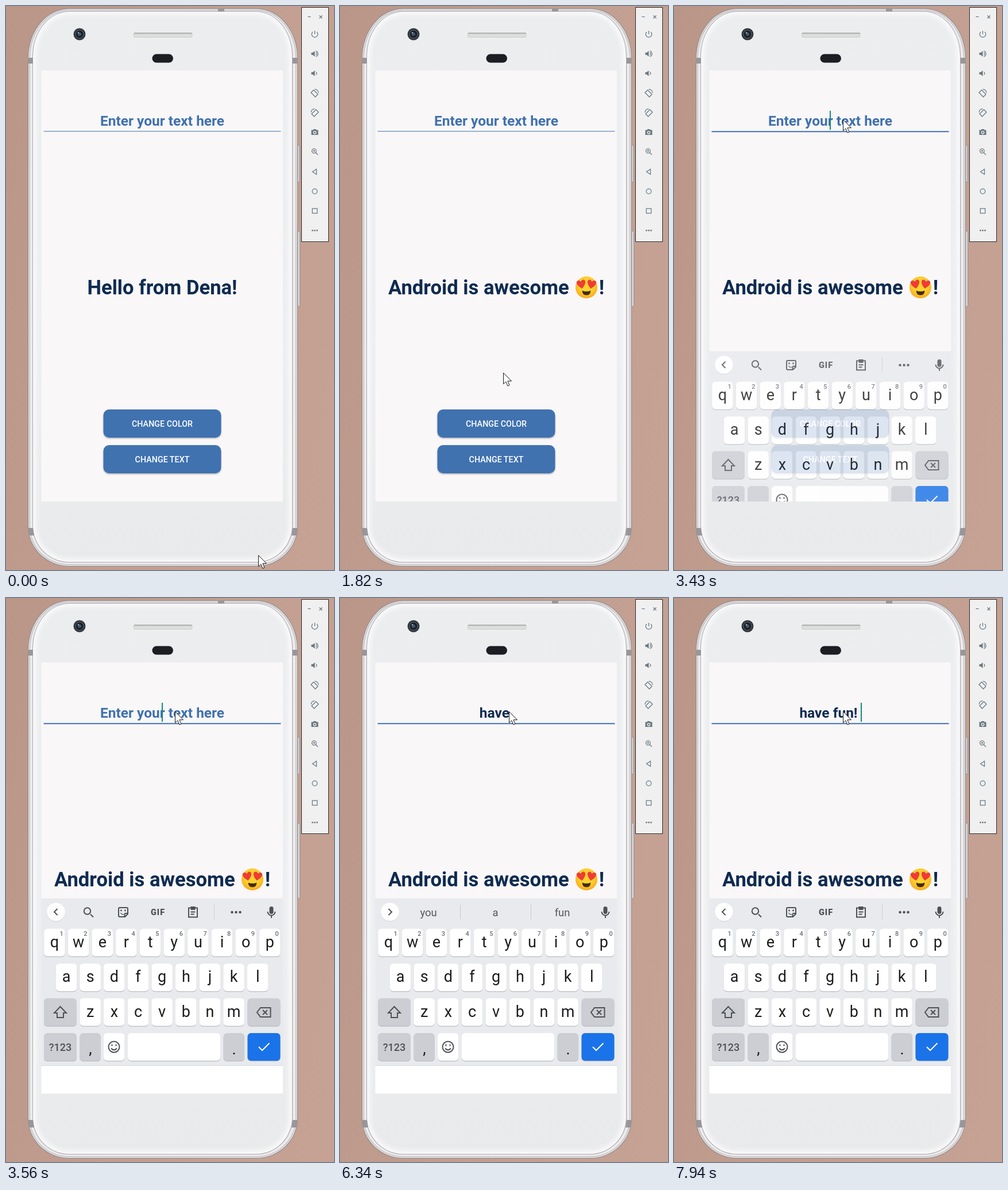
Write an HTML page that moves like this. It is 571x980 px and loops after 8000 ms.

```html
<!DOCTYPE html>
<html lang="en">
<head>
<meta charset="utf-8">
<title>Phone emulator demo</title>
<style>
html, body { margin: 0; width: 100%; height: 100%; overflow: hidden; }
#stage {
  position: relative; width: 571px; height: 980px; overflow: hidden;
  font-family: Roboto, sans-serif;
  background: linear-gradient(100deg, #b99687, #c19e8f 45%, #c6a294);
}
#stage > * { position: absolute; }
svg { left: 0; top: 0; }
text { text-anchor: middle; font-family: Roboto, sans-serif; }
.body {
  left: 38px; top: 4px; width: 470px; height: 970px; box-sizing: border-box;
  border: 1.5px solid #8b878a; background: #dedcde;
  border-radius: 72px 72px 72px 72px / 86px 86px 70px 70px;
  box-shadow: inset 0 0 0 1.5px #e6e4e6, inset 0 0 0 3px #c4c1c3, inset 0 0 0 7px #edebec;
}
.face {
  left: 46px; top: 9px; width: 453px; height: 958px; box-sizing: border-box;
  border: 1px solid #aaa8ad; background: linear-gradient(#ebedee, #edeef0 60%, #e9eaeb);
  border-radius: 64px 64px 64px 64px / 78px 78px 64px 64px;
  box-shadow: inset 0 0 9px 5px #fbfbfc;
}
.tools {
  left: 514px; top: 2px; width: 48px; height: 408px; box-sizing: border-box;
  border: 1px solid #2b2b2b; background: #f0f0f0;
}
.big { font-size: 34.65px; font-weight: 700; fill: #0f2b50; }
.hint { font-size: 24.5px; font-weight: 700; fill: #4071af; }
.btn { font-size: 14.3px; font-weight: 500; fill: #fff; }
.letter { font-size: 27px; fill: #1b1c1e; }
.digit { font-size: 11px; font-weight: 500; fill: #6c6e72; }
.word { font-size: 18.4px; fill: #54575b; }
.line { fill: none; stroke: currentColor; stroke-width: 2; }
.thin { fill: none; stroke: currentColor; stroke-width: 1.25; }
.solid { fill: currentColor; }
#field {
  left: 61px; top: 183.3px; width: 422px; height: 33px; line-height: 33px;
  font-size: 24.5px; font-weight: 700; color: #0f2b50;
  text-align: center; white-space: pre;
}
#field u { text-decoration-thickness: 1.5px; text-underline-offset: 2px; text-decoration-skip-ink: none; }
#caret { display: inline-block; position: relative; width: 0; height: 0; }
#caret::after {
  content: ""; position: absolute; left: -1px; top: -26px;
  width: 2px; height: 33px; background: #12897f;
}
</style>
</head>
<body>
<div id="stage">
  <div class="body"></div>
  <div class="face"></div>
  <div class="tools"></div>

  <svg width="571" height="980" viewBox="0 0 571 980">
    <defs>
      <clipPath id="screen"><path d="M61.500 112H482V861H61.500Z"/></clipPath>
      <clipPath id="pressed"><rect x="169.500" y="763" width="205" height="49" rx="10"/></clipPath>
      <radialGradient id="skin" cy=".4" r=".62">
        <stop offset=".5" stop-color="#fdd32f"/><stop offset="1" stop-color="#f7a71f"/>
      </radialGradient>
      <filter id="drop" x="-5%" y="-10%" width="110%" height="135%">
        <feDropShadow dx="0" dy="1.5" stdDeviation="1.3" flood-opacity=".3"/>
      </filter>
    </defs>

    <!-- hardware -->
    <g fill="#99969a">
      <path d="M38 90h9v10h-9zM499 90h9v10h-9zM38 907h9l2 13h-9zM499 907h9l-2 13h-9zM369 4h11v5h-11z"/>
    </g>
    <g fill="#e2e0e1" stroke="#8f8c8e">
      <rect x="508" y="242" width="3" height="64" rx="1.500"/>
      <rect x="508" y="391" width="3.500" height="131" rx="1.500"/>
    </g>
    <circle cx="128" cy="49" r="10.500" fill="#34393f"/>
    <circle cx="128" cy="49" r="7" fill="#1b2027" stroke="#59636c"/>
    <circle cx="128" cy="49" r="3" fill="#42576a"/>
    <circle cx="126" cy="46.500" r="1.300" fill="#9fb0bd"/>
    <rect x="222.500" y="46.500" width="101.500" height="8" rx="2" fill="#dcdedd" stroke="#cdcecd"/>
    <path d="M223 47.500H324" stroke="#a5a7a6" stroke-width="1.500"/>
    <rect x="254.500" y="83.500" width="36.500" height="15" rx="7.500" fill="#1c1e23"/>

    <!-- emulator panel -->
    <g id="panel" color="#687982"></g>

    <!-- app -->
    <path d="M61.500 112H482V861H61.500Z" fill="#f9f7f8"/>
    <text id="hint" class="hint" x="272" y="208.200">Enter your text here</text>
    <path id="rule" stroke="#4172b0"/>
    <text id="before" class="big" x="272" y="501">Hello from Dena!</text>
    <g id="after">
      <text class="big" x="83.900" y="501" style="text-anchor:start">Android is awesome</text>
      <text class="big" x="455.500" y="501">!</text>
      <g transform="translate(429 489)">
        <circle r="19" fill="url(#skin)"/>
        <path d="M-7.500 5.500Q0 8.500 7.500 5.500Q7 13.500 0 13.500T-7.500 5.500Z" fill="#432c13"/>
        <g fill="#ef3b36">
          <path id="heart" transform="translate(-9 -6) rotate(-10) scale(.95)" d="M0 8.500C-5 5-9-1-8-4.500C-7-8-2-8.500 0-4C2-8.500 7-8 8-4.500C9-1 5 5 0 8.500Z"/>
          <use href="#heart" transform="scale(-1 1)"/>
        </g>
      </g>
    </g>
    <g fill="#4172b0" filter="url(#drop)">
      <rect x="169.500" y="701" width="205" height="49" rx="10"/>
      <rect x="169.500" y="763" width="205" height="49" rx="10"/>
    </g>
    <circle id="ripple" cx="301" cy="794" fill="#fff" clip-path="url(#pressed)"/>
    <text class="btn" x="272" y="731.300">CHANGE COLOR</text>
    <text class="btn" x="272" y="793">CHANGE TEXT</text>

    <!-- keyboard -->
    <g clip-path="url(#screen)">
      <g id="board" color="#4d5156">
        <path d="M61 522H483V862H61Z" fill="#e8eaed"/>
        <g id="keys"></g>
        <path d="M61 813H483V862H61Z" fill="#fff"/>
        <path d="M61 812.500H483" stroke="#d7d9dc"/>
        <circle cx="87" cy="546.500" r="15.800" fill="#cfd1d5"/>
        <circle cx="87" cy="545.500" r="15.800" fill="#fff"/>
        <path id="chevron" class="line"/>
        <g transform="translate(462 546)">
          <rect class="solid" x="-3.500" y="-10" width="7" height="13" rx="3.500"/>
          <path class="line" d="M-6.500-1A6.500 6.500 0 0 0 6.500-1M0 5.500V10"/>
        </g>
        <g id="shortcuts">
          <path class="line" d="M147 549.500L152 554.500"/>
          <circle class="line" cx="141.500" cy="544" r="5.700"/>
          <g transform="translate(204 546)">
            <path class="line" d="M-6-8H6Q8-8 8-6V3L3 8H-6Q-8 8-8 6V-6Q-8-8-6-8ZM8 2H4Q2.500 2 2.500 4V8" stroke-width="1.800"/>
            <path class="thin" d="M-4.500 1Q-2 5 1 3.500"/>
            <circle class="solid" cx="-3.500" cy="-3" r="1.400"/><circle class="solid" cx="3.500" cy="-3" r="1.400"/>
          </g>
          <text class="solid" x="264.500" y="551" font-size="14.500" font-weight="900" letter-spacing="1">GIF</text>
          <g transform="translate(325.500 546)">
            <path class="line" d="M-7.500-7.500H7.500V8.500H-7.500Z"/>
            <path class="solid" d="M-4-10H4V-4H-4Z"/>
            <path class="line" d="M-4-.500H4M-4 3.500H2" stroke-width="1.600"/>
          </g>
          <path d="M362.500 533V558" stroke="#cdcfd3"/>
          <g class="solid"><circle cx="393.500" cy="546" r="2.200"/><circle cx="400.500" cy="546" r="2.200"/><circle cx="407.500" cy="546" r="2.200"/></g>
        </g>
        <g id="words">
          <path d="M209.500 533V558M332.500 533V558" stroke="#c6c8cc"/>
          <text class="word" x="154" y="552.500"></text>
          <text class="word" x="270.500" y="552.500"></text>
          <text class="word" x="387" y="552.500"></text>
        </g>
      </g>
    </g>
  </svg>

  <div id="field"><span></span><u></u><span></span><i id="caret"></i></div>

  <svg width="571" height="980" viewBox="0 0 571 980">
    <g id="pointer">
      <circle id="click" r="15" fill="#ff0" fill-opacity=".47"/>
      <path d="M.500.500V19.800L4.800 15.800L8 23.200L11 21.900L7.900 14.700H14.500Z" fill="#fff" stroke="#1a1a1a" stroke-linejoin="round"/>
    </g>
  </svg>
</div>

<script>
const $ = id => document.getElementById(id);
const LOOP = 8000;

function add(parent, tag, attrs, text = '') {
  const node = document.createElementNS('http://www.w3.org/2000/svg', tag);
  for (const name in attrs) node.setAttribute(name, attrs[name]);
  node.textContent = text;
  return parent.appendChild(node);
}

// Emulator panel: [y, outline, filled shape, flip]
const speaker = 'M-6-2h2.500L0-5V5L-3.500 2H-6z';
const dot = x => `M${x} -1.400a1.400 1.400 0 1 0 .01 0z`;
const turn = 'M-6.500-.500L-2-5L5.500 2.500L1 7ZM0-6.500A6.500 6.500 0 0 1 6.500 0';
const tools = [
  [49, 'M0-6V0M-3.500-4A5.300 5.300 0 1 0 3.500-4'],
  [83, 'M2-2.500A3 3 0 0 1 2 2.500M2-5A5.300 5.300 0 0 1 2 5', speaker],
  [117, 'M2-2.500A3 3 0 0 1 2 2.500', speaker],
  [151, turn],
  [185, turn, '', 'scale(-1 1)'],
  [219, '', 'M-6-3.500h3l1-1.500h4l1 1.500h3v8.500h-12z'],
  [253, 'M-5 -1.200a3.800 3.800 0 1 0 7.600 0a3.800 3.800 0 1 0 -7.600 0M1.700 1.700L5.500 5.500M-3-1.200H.600M-1.200-3V.600'],
  [288, 'M3-4.500V4.500L-4 0Z'],
  [322, 'M-4.300 0a4.300 4.300 0 1 0 8.600 0a4.300 4.300 0 1 0 -8.600 0'],
  [356, 'M-4.200-4.200H4.200V4.200H-4.200Z'],
  [390, '', dot(-4) + dot(0) + dot(4)]
];
for (const [y, outline, shape, flip = ''] of tools) {
  const g = add($('panel'), 'g', { transform: `translate(537.5 ${y}) ${flip}` });
  if (outline) add(g, 'path', { class: 'thin', d: outline });
  if (shape) add(g, 'path', { class: 'solid', d: shape });
}
add($('panel'), 'circle', { cx: 537.5, cy: 219.8, r: 2.2, fill: '#687982', stroke: '#f0f0f0', 'stroke-width': 1.3 });
add($('panel'), 'path', { class: 'thin', d: 'M525.500 18.500h5M545.500 16.500l5 5M550.500 16.500l-5 5' });

// Keyboard
const keys = $('keys');
const PITCH = 41.65, GREY = '#ccced4';
const rowY = row => 574.8 + 60.4 * row;

function key(x, row, width = 36.5, fill = '#fff') {
  const box = { x, width, height: 48, rx: 6 };
  add(keys, 'rect', { ...box, y: rowY(row) + 1.2, fill: '#b9bcc2' });
  add(keys, 'rect', { ...box, y: rowY(row), fill });
}
['qwertyuiop', 'asdfghjkl', 'zxcvbnm'].forEach((letters, row) => {
  [...letters].forEach((letter, i) => {
    const x = [66.2, 86.8, 128.4][row] + PITCH * i;
    key(x, row);
    add(keys, 'text', { class: 'letter', x: x + 18.3, y: rowY(row) + 32 }, letter);
    if (!row) add(keys, 'text', { class: 'digit', x: x + 30.5, y: 587 }, (i + 1) % 10);
  });
});
key(66, 2, 57, GREY);
key(420.5, 2, 57, GREY);
key(66, 3, 57, GREY);
key(128.4, 3, 36.5, GREY);
key(170, 3);
key(212, 3, 161);
key(378.6, 3, 36.5, GREY);
key(420.5, 3, 57, '#1a73e8');

const mark = (x, y, d, color = '#4d5156') =>
  add(keys, 'path', { class: 'line', transform: `translate(${x} ${y})`, d, color });
mark(94.5, 720, 'M0-10L10.500 1H5.500V9H-5.500V1H-10.500Z');
mark(449, 720, 'M-6-8H11.500V8H-6L-12 0ZM-2-4L6 4M6-4L-2 4');
mark(188, 780, 'M-9.500 0a9.500 9.500 0 1 0 19 0a9.500 9.500 0 1 0 -19 0M-5 2.500Q0 8 5 2.500M-3.500-4.500v3M3.500-4.500v3');
mark(449, 780, 'M-9 0L-3 6L9.500-6.500', '#fff');
add(keys, 'text', { class: 'solid', x: 94.5, y: 786.5, 'font-size': 18, 'font-weight': 500 }, '?123');
add(keys, 'text', { class: 'letter', x: 147, y: 792 }, ',');
add(keys, 'text', { class: 'letter', x: 397, y: 793 }, '.');

// Timelines: [start, value...]
const typed = [
  [0, '', '', ''], [4280, '', '', 'h'], [4480, '', '', 'ha'], [4540, '', 'h', 'a'],
  [4800, '', 'ha', ''], [5270, '', 'ha', 'v'], [5470, '', 'hav', 'e'], [5610, '', 'have', ' '],
  [5800, 'have ', '', ''], [6530, 'have ', '', 'f'], [6660, 'have ', 'f', 'u'],
  [6860, 'have ', 'fu', 'n'], [7070, 'have ', 'fun', ''], [7540, 'have fun ', '', ''],
  [7810, 'have fun! ', '', '']
];
const offers = [
  [0, ''], [4540, 'h have he'], [4800, 'ha have happy'], [5470, 'hav have having'],
  [5610, 'have haven gave'], [5870, 'you a fun'], [6660, 'f for fun'],
  [6860, 'fu fun full'], [7130, 'fun fund funny'], [7940, '']
];
const slide = [[0, 340, 0], [3430, 78, .82], [3500, 18, .96], [3560, 0, 1]];
const caretOn = [[0, 0], [3030, 1], [3760, 0], [4220, 1], [6340, 0], [6530, 1]];

const at = (list, t) => list.findLast(entry => entry[0] <= t);
const between = (t, a, b) => t >= a && t < b;
const show = (node, on) => { node.style.display = on ? '' : 'none'; };

// Progress that advances in `count` jumps, the first at `start`, the last at `end`
function steps(t, start, end, count) {
  if (t < start) return 0;
  const done = Math.floor((t - start) / (end - start) * (count - 1) + 1e-6) + 1;
  return Math.min(done, count) / count;
}

function pointerAt(t) {
  if (t < 1820) {
    const k = steps(t, 70, 550, 8), p = k * (2 - k);
    return [439 - 138 * p, 954 - 160 * p];
  }
  if (t < 2560) {
    const p = 1 - (1 - steps(t, 1820, 2360, 9)) ** 2.7;
    return [301 - 83 * p + 75 * p * p, 794 - 575 * p];
  }
  const p = steps(t, 2560, 2760, 4);
  return [293 + p, 219 - 22 * p];
}

const [plain, composing, rest] = $('field').children;
const words = $('words').querySelectorAll('text');

function render(t) {
  $('pointer').setAttribute('transform', `translate(${pointerAt(t).map(Math.round)})`);
  show($('click'), between(t, 1010, 1210) || between(t, 3030, 3230));

  const r = steps(t, 1010, 1430, 7);
  $('ripple').setAttribute('r', 20 + 300 * r);
  $('ripple').setAttribute('opacity', r > 0 ? .24 * Math.min(1, 2 * (1 - r)) : 0);
  show($('before'), t < 1220);
  show($('after'), t >= 1220);

  const focused = t >= 3030;
  $('rule').setAttribute('d', `M65.500 ${focused ? 218.3 : 217.8}H478.500`);
  $('rule').setAttribute('stroke-width', focused ? 2.1 : 1.1);

  const [, head, under, tail] = at(typed, t);
  plain.textContent = head;
  composing.textContent = under;
  rest.textContent = tail;
  show($('hint'), !(head + under + tail));
  $('caret').style.visibility = at(caretOn, t)[1] ? 'visible' : 'hidden';

  const [, drop, alpha] = at(slide, t);
  $('board').setAttribute('transform', `translate(0 ${drop})`);
  $('board').setAttribute('opacity', alpha);

  const offer = at(offers, t)[1];
  show($('words'), offer);
  show($('shortcuts'), !offer);
  $('chevron').setAttribute('d', offer ? 'M84.500 540L90 545.500L84.500 551' : 'M89.500 540L84 545.500L89.500 551');
  offer.split(' ').forEach((word, i) => { words[i].textContent = word; });
}

const origin = performance.now();
function tick() {
  render((performance.now() - origin) % LOOP);
  requestAnimationFrame(tick);
}
tick();
</script>
</body>
</html>
```
